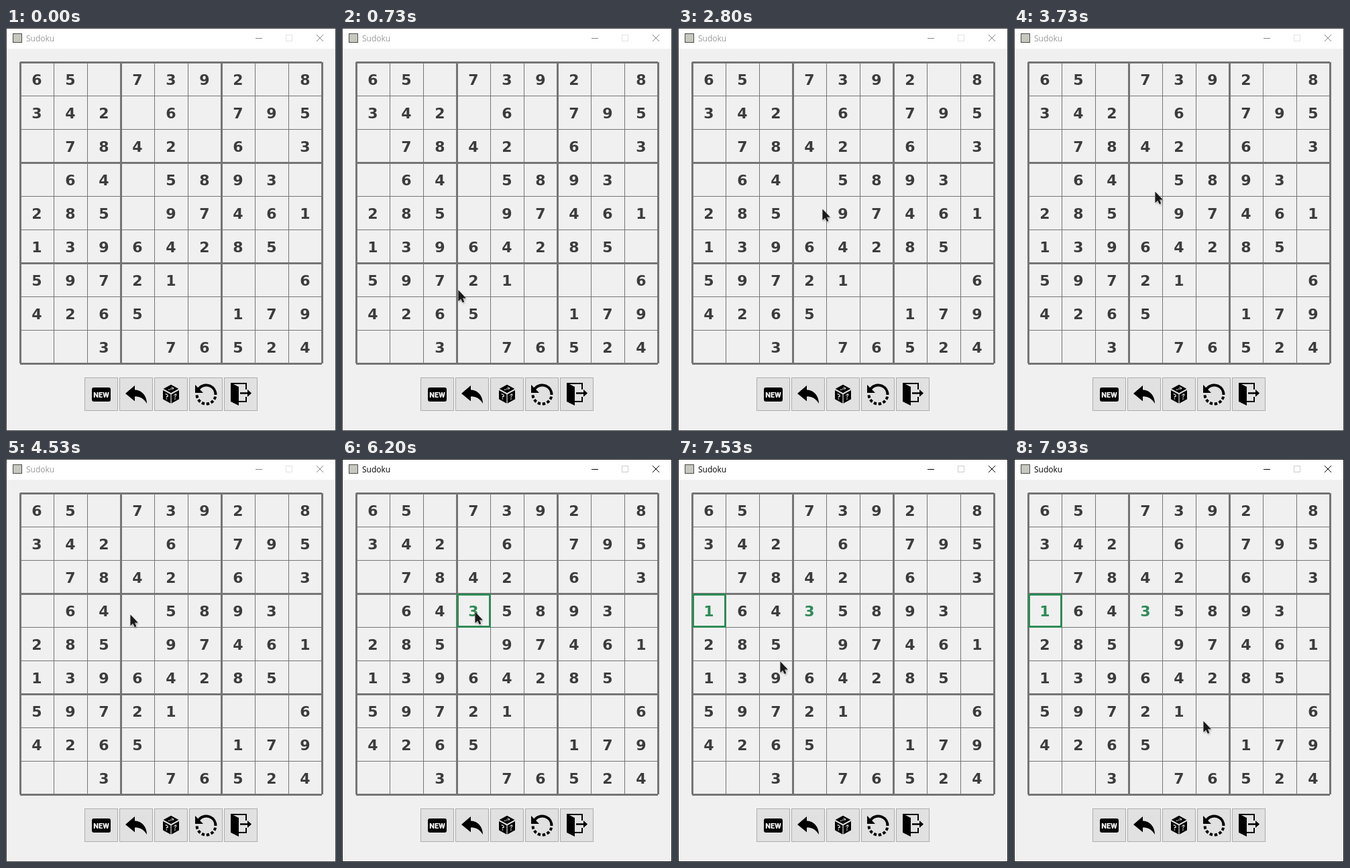
Recreate the animation shown at these times as an HTML page with a canvas. Size 492 px wide and 602 px high, loop 8 s.

```html
<!DOCTYPE html>
<html lang="en">
<head>
<meta charset="utf-8">
<title>Sudoku</title>
<style>
  html, body { margin: 0; width: 100%; height: 100%; overflow: hidden; background: #f0f0f0; }
  canvas { display: block; width: 492px; height: 602px; }
</style>
</head>
<body>
<canvas id="stage"></canvas>
<script>
const W = 492, H = 602, LOOP = 8000, TICK = 1000 / 15;
const canvas = document.getElementById('stage');
const ctx = canvas.getContext('2d');
const dpr = window.devicePixelRatio || 1;
canvas.width = W * dpr;
canvas.height = H * dpr;
ctx.scale(dpr, dpr);

const LEFT = 21, TOP = 51, CELL = 50;
const GREEN = '#2e8b57', LINE = '#757575', FACE = '#e1e1e1';
const DIGIT_FONT = 'bold 22px "DejaVu Sans", sans-serif';

const board = [
  '65.7392.8', '342.6.795', '.7842.6.3',
  '.64.5893.', '285.97461', '13964285.',
  '59721...6', '4265..179', '..3.76524'
];

// Game events, in ticks
const FOCUS = 73, TYPE_THREE = 93, PICK_NEXT = 100, TYPE_ONE = 102;

// Pointer moves; each one starts where the last ended and rests until the next
const moves = [
  { from: 3, to: 11, x: 173, y: 391 },
  { from: 15, to: 17, x: 190, y: 382 },
  { from: 30, to: 34, x: 192, y: 271, bend: -7 },
  { from: 38, to: 42, x: 215, y: 270 },
  { from: 43, to: 44, x: 191, y: 201 },
  { from: 46, to: 47, x: 176, y: 218 },
  { from: 50, to: 56, x: 210, y: 244 },
  { from: 59, to: 63, x: 200, y: 442 },
  { from: 64, to: 68, x: 185, y: 232, bend: -7 },
  { from: 70, to: 71, x: 198, y: 228 },
  { from: 95, to: 97, x: 52, y: 235 },
  { from: 105, to: 109, x: 113, y: 265 },
  { from: 112, to: 117, x: 263, y: 409 },
  { from: 118, to: 119, x: 282, y: 391 }
];

const smooth = k => k * k * (3 - 2 * k);

function pointerAt(tick) {
  let x = W, y = H;
  for (const m of moves) {
    if (tick < m.from) break;
    const k = smooth(Math.min(1, (tick - m.from + 1) / (m.to - m.from + 1)));
    x += (m.x - x) * k + (m.bend || 0) * Math.sin(Math.PI * k);
    y += (m.y - y) * k;
  }
  return [Math.round(x), Math.round(y)];
}

function rect(color, x, y, w, h) {
  ctx.fillStyle = color;
  ctx.fillRect(x, y, w, h);
}

function box(color, x, y, w, h, line = 1) {
  ctx.strokeStyle = color;
  ctx.lineWidth = line;
  ctx.strokeRect(x + line / 2, y + line / 2, w - line, h - line);
}

function fillPath(color, d) {
  ctx.fillStyle = color;
  ctx.fill(new Path2D(d));
}

function strokePath(color, d, width) {
  ctx.strokeStyle = color;
  ctx.lineWidth = width;
  ctx.stroke(new Path2D(d));
}

function text(s, x, y, font, color, align = 'center') {
  ctx.font = font;
  ctx.fillStyle = color;
  ctx.textAlign = align;
  ctx.fillText(s, x, y);
}

function drawWindow(active) {
  rect('#f0f0f0', 0, 0, W, H);
  rect('#fff', 0, 0, W, 31);
  box(active ? '#1c1c1c' : '#424242', 0, 0, W, H);
  rect('#c6c7bd', 10, 8, 14, 14);
  box('#4b4b4b', 10, 8, 14, 14);
  text('Sudoku', 30, 20, '12px "Open Sans", "Noto Sans", sans-serif', active ? '#000' : '#999', 'left');
  const ink = active ? '#000' : '#858585';
  rect(ink, 372, 15, 10, 1);
  box(active ? '#ccc' : '#e2e2e2', 417, 10, 10, 10);
  strokePath(ink, 'M463 10L473 20M473 10L463 20', 1);
}

function drawGrid() {
  for (let i = 0; i < 10; i++) {
    const thick = i % 3 === 0, w = thick ? 3 : 1, off = i * CELL - (thick ? 1 : 0);
    rect(LINE, LEFT + off, TOP, w, 9 * CELL);
    rect(LINE, LEFT, TOP + off, 9 * CELL, w);
  }
}

function drawDigit(s, col, row, color) {
  text(s, LEFT + col * CELL + 25, TOP + row * CELL + 34, DIGIT_FONT, color);
}

function drawBoard(tick) {
  drawGrid();
  board.forEach((line, row) => [...line].forEach((s, col) => {
    if (s !== '.') drawDigit(s, col, row, '#3c3c3c');
  }));
  if (tick >= TYPE_THREE) drawDigit('3', 3, 3, GREEN);
  if (tick >= TYPE_ONE) drawDigit('1', 0, 3, GREEN);
  if (tick >= FOCUS) {
    const col = tick >= PICK_NEXT ? 0 : 3;
    box(GREEN, LEFT + col * CELL, TOP + 3 * CELL, 51, 51, 3);
  }
}

// Icons are drawn relative to the centre of their button
function newIcon() {
  ctx.fillStyle = '#000';
  ctx.beginPath();
  ctx.roundRect(-14, -10, 28, 21, 3);
  ctx.fill();
  text('NEW', 0, 4.5, '900 11px Roboto, sans-serif', '#fff');
}

function backIcon() {
  fillPath('#000', 'M-16-1L-2-13V-6.5C9-6 16 3 16 14C11 6 6 3.5-2 3.5V10.5Z');
}

function dieFace(a, b, c, d, x, y) {
  ctx.save();
  ctx.transform(a, b, c, d, x, y);
  rect('#000', -6, -6, 12, 12);
  text('?', 0, 3.6, 'bold 10px "Open Sans", sans-serif', FACE);
  ctx.restore();
}

function diceIcon() {
  dieFace(0.95, 0.52, -0.95, 0.52, 0, -8);
  dieFace(0.95, 0.52, 0, 1.12, -6.3, 3.8);
  dieFace(0.95, -0.52, 0, 1.12, 6.3, 3.8);
}

function arc(from, to) {
  const rad = Math.PI / 180;
  ctx.beginPath();
  ctx.arc(0.5, 0.5, 14, from * rad, to * rad);
  ctx.stroke();
}

function resetIcon() {
  ctx.strokeStyle = '#000';
  ctx.lineWidth = 4;
  arc(-155, 2);
  for (let a = 13; a < 175; a += 29) arc(a, a + 18);
  fillPath('#000', 'M-16-14V-2H-4Z');
}

function exitIcon() {
  fillPath('#000', 'M-15-17L-3-11V17L-15 11Z');
  strokePath('#000', 'M-15-16H8V-7M8 4V11H-3', 2);
  strokePath('#000', 'M-1-1.5H12', 2.5);
  fillPath('#000', 'M10-7L16-1.5L10 4Z');
}

function drawButtons() {
  [newIcon, backIcon, diceIcon, resetIcon, exitIcon].forEach((icon, i) => {
    const x = 117 + i * 52, y = 522;
    rect(FACE, x, y, 50, 50);
    box('#adadad', x, y, 50, 50);
    ctx.save();
    ctx.translate(x + 25, y + 25);
    icon();
    ctx.restore();
  });
}

function drawPointer(x, y) {
  const arrow = 'M.5 .5V17L4.3 13.4L6.8 19L9.2 18L6.8 12.4H11.7Z';
  ctx.save();
  ctx.translate(x, y);
  ctx.shadowColor = 'rgba(0,0,0,.35)';
  ctx.shadowBlur = 3 * dpr;
  ctx.shadowOffsetX = dpr;
  ctx.shadowOffsetY = 2 * dpr;
  fillPath('#1a1a1a', arrow);
  ctx.shadowColor = 'transparent';
  strokePath('rgba(255,255,255,.6)', arrow, 1);
  fillPath('#1a1a1a', arrow);
  ctx.restore();
}

function draw(ms) {
  // A few ms of lead keep each step on its rounded start time
  const tick = Math.floor((ms % LOOP + 5) / TICK) % 120;
  drawWindow(tick >= FOCUS);
  drawBoard(tick);
  drawButtons();
  if (tick >= moves[0].from) drawPointer(...pointerAt(tick));
}

const start = performance.now();
function frame() {
  draw(performance.now() - start);
  requestAnimationFrame(frame);
}
frame();
</script>
</body>
</html>
```
